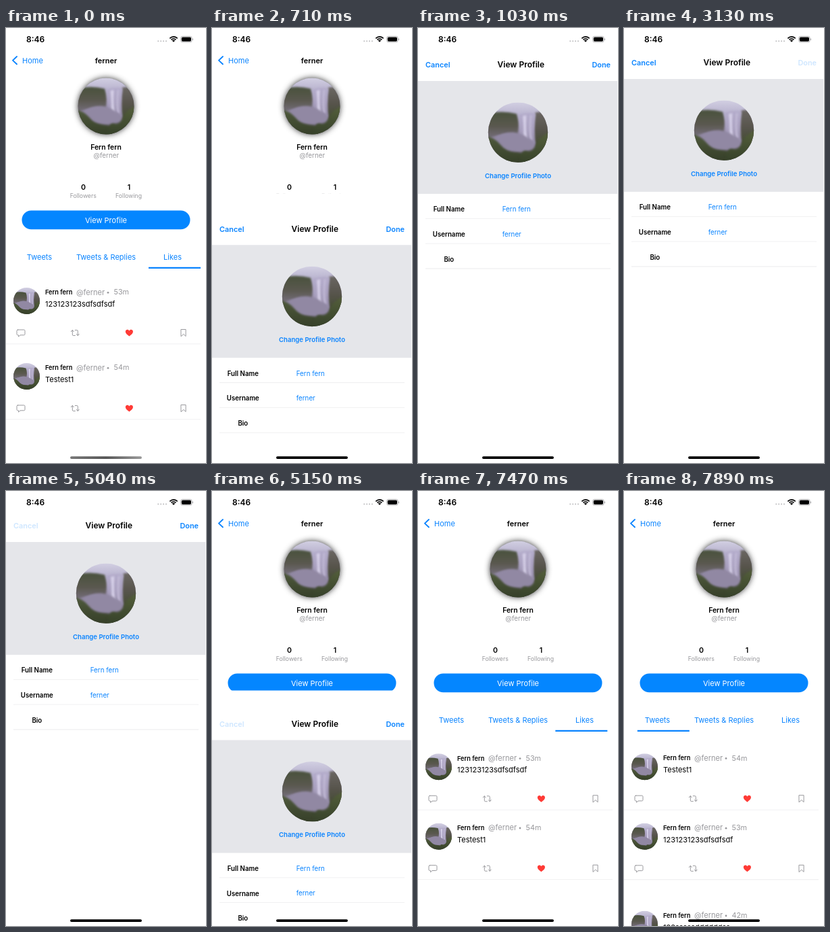
Animation of 296 by 640 pixels, one loop 8000 ms. Source, as an HTML page with a canvas:

```html
<!DOCTYPE html>
<html lang="en">
<head>
<meta charset="utf-8">
<title>Profile sheet</title>
<style>
html, body { margin: 0; width: 100%; height: 100%; overflow: hidden; background: #fff; }
canvas { display: block; width: 296px; height: 640px; }
</style>
</head>
<body>
<canvas id="stage"></canvas>
<script>
const W = 296, H = 640, LOOP = 8000;
const BLUE = '#0a84ff', GREY = '#98989c', LINE = '#ececee', INK = '#000';
const NAME = 'Fern fern', USER = 'ferner';

// The picture only updates at these times (ms).
const STEPS = [0, 500, 610, 710, 810, 920, 1030, 3130, 3250, 3370, 3480, 3600, 3720,
  4930, 5040, 5150, 5260, 5370, 5480, 7470, 7580, 7680, 7780, 7890];

const canvas = document.getElementById('stage');
const ctx = canvas.getContext('2d');
const dpr = window.devicePixelRatio || 1;
canvas.width = W * dpr;
canvas.height = H * dpr;

const clamp = v => Math.min(1, Math.max(0, v));
const mix = (a, b, p) => a + (b - a) * p;
const spring = x => x <= 0 ? 0 : 1 - (1 + x) * Math.exp(-x);

// y is the middle of the capital letters.
function text(str, x, y, size, { weight = 400, color = INK, align = 'left', alpha = 1 } = {}) {
  ctx.save();
  ctx.globalAlpha *= alpha;
  ctx.font = `${weight} ${size}px Inter, Roboto, sans-serif`;
  ctx.fillStyle = color;
  ctx.textAlign = align;
  ctx.fillText(str, x, y + size * 0.364);
  ctx.restore();
}

function rect(x, y, w, h, color, r = 0) {
  ctx.fillStyle = color;
  ctx.beginPath();
  ctx.roundRect(x, y, w, h, r);
  ctx.fill();
}

function disc(x, y, r, color) {
  ctx.fillStyle = color;
  ctx.beginPath();
  ctx.arc(x, y, r, 0, Math.PI * 2);
  ctx.fill();
}

function stroke(path, x, y, color, width) {
  ctx.save();
  ctx.translate(x, y);
  ctx.strokeStyle = color;
  ctx.lineWidth = width;
  ctx.lineCap = ctx.lineJoin = 'round';
  ctx.stroke(new Path2D(path));
  ctx.restore();
}

function shape(path, color) {
  ctx.fillStyle = color;
  ctx.fill(new Path2D(path));
}

function blend(y0, y1, ...colors) {
  const g = ctx.createLinearGradient(0, y0, 0, y1);
  colors.forEach((c, i) => g.addColorStop(i / (colors.length - 1), c));
  return g;
}

// Soft waterfall landscape in a circle.
function photo(x, y, r) {
  ctx.save();
  ctx.beginPath();
  ctx.arc(x, y, r, 0, Math.PI * 2);
  ctx.clip();
  ctx.translate(x, y);
  ctx.scale(r, r);
  rect(-1, -1, 2, 2, blend(-1, 1, '#d2cfe2', '#b4aecb', '#988fac', '#7d758c', '#4a4a44'));
  ctx.filter = `blur(${r * 0.035 * dpr}px)`;
  // cliffs
  shape('M-1.2-.58Q-.6-.76-.05-.62Q.08-.3-.02.1Q-.5-.05-1.2.3Z', blend(-.7, .3, '#48513b', '#5a584f', '#7b7385'));
  shape('M.58-.66Q.85-.72 1.2-.6V.5H.6Q.5 0 .58-.66Z', blend(-.7, .5, '#6b6763', '#57544c', '#424b30'));
  // falling water and mist
  shape('M.02-.58Q.35-.68.58-.62Q.5 0 .58.4H.02Q.1 0 .02-.58Z', blend(-.6, .4, '#b3abca', '#aaa1c0', '#958ca8'));
  shape('M.16-.55L.28-.57Q.24 0 .34.32H.16Q.22 0 .16-.55Z', '#d6d0e8');
  shape('M.4-.58H.47Q.4-.1.48.25H.4Q.35-.1.4-.58Z', '#c2bad6');
  shape('M-.8.2Q-.3-.15.2.1T.5.55Q0 .75-.5.55Z', '#9188a3');
  // foreground plants
  shape('M-1.2.08Q-.8.15-.6.4T-.1.66T.3.85V1.2H-1.2Z', blend(.1, 1, '#4f5a3c', '#363f29'));
  shape('M1.2-.05Q.75.08.62.38T.3.62T.05.9V1.2H1.2Z', blend(0, 1, '#545f3b', '#36412a'));
  ctx.restore();
}

function statusBar() {
  text('8:46', 30, 17, 12, { weight: 600 });
  for (let i = 0; i < 4; i++) disc(225.3 + i * 3.9, 19.3, 1.1, '#c4c4c6');
  ctx.strokeStyle = INK;
  ctx.lineWidth = 1.7;
  ctx.lineCap = 'butt';
  for (const r of [4.7, 7.7]) {
    ctx.beginPath();
    ctx.arc(248, 20.6, r, -Math.PI * 0.76, -Math.PI * 0.24);
    ctx.stroke();
  }
  shape('M248 20.8L245.8 18.5Q248 16.7 250.2 18.5Z', INK);
  ctx.strokeStyle = '#a4a4a6';
  ctx.lineWidth = 0.8;
  ctx.beginPath();
  ctx.roundRect(258.6, 12.3, 16.6, 8.6, 2.6);
  ctx.stroke();
  rect(259.8, 13.5, 14.2, 6.2, INK, 1.6);
  rect(276, 15.2, 1, 2.8, '#a4a4a6', 0.5);
}

function homeBar(faded) {
  let color = INK;
  if (faded) {
    color = ctx.createLinearGradient(95, 0, 201, 0);
    color.addColorStop(0, '#777');
    color.addColorStop(0.5, '#555');
    color.addColorStop(1, '#999');
  }
  rect(95, 630.2, 106, 3.8, color, 1.9);
}

function post(y, body, age) {
  photo(30.5, y + 13, 19.5);
  text(NAME, 58, y + 0.5, 9.2, { weight: 600 });
  text('@' + USER, 104, y, 11, { color: GREY });
  disc(151, y + 0.8, 1.4, GREY);
  text(age, 159.5, y, 10.8, { color: GREY });
  text(body, 58, y + 17.5, 11);

  const mid = y + 60;
  stroke('M-4.5-4.5H4.5Q6-4.5 6-3V1.8Q6 3.3 4.5 3.3H-1L-3.4 5.6V3.3H-4.5Q-6 3.3-6 1.8V-3Q-6-4.5-4.5-4.5Z',
    22, mid, '#9a9a9e', 1);
  stroke('M-6-1.8L-4-4L-2-1.8M-4-4V2.4Q-4 4-2.5 4H0M6 1.8L4 4L2 1.8M4 4V-2.4Q4-4 2.5-4H0',
    102.3, mid, '#9a9a9e', 1);
  stroke('M-3.4-5H3.4V5L0 1.9L-3.4 5Z', 262.7, mid, '#9a9a9e', 1);
  ctx.save();
  ctx.translate(182.4, mid);
  shape('M0 5C-3.2 2.7-5.6.6-5.6-1.8C-5.6-5-1.6-6 0-3.1C1.6-6 5.6-5 5.6-1.8C5.6.6 3.2 2.7 0 5Z', '#ff3b36');
  ctx.restore();
  rect(0, y + 76, 288, 0.8, LINE);
}

function profile(t) {
  stroke('M6-5.6L0 0L6 5.6', 10, 47.6, BLUE, 1.9);
  text('Home', 24, 48, 11, { color: BLUE });
  const mid = { align: 'center' }, strong = { weight: 600, align: 'center' };
  const soft = { color: GREY, align: 'center' };
  text(USER, 148, 48, 11, strong);

  ctx.save();
  ctx.shadowColor = 'rgba(0,0,0,.85)';
  ctx.shadowBlur = 10 * dpr;
  disc(148, 115, 41, '#444');
  ctx.restore();
  photo(148, 115, 41.5);
  text(NAME, 148, 175, 10.4, strong);
  text('@' + USER, 148.3, 187.5, 9.8, soft);

  text('0', 114.5, 234.5, 10.6, strong);
  text('1', 182, 234.5, 10.6, strong);
  text('Followers', 114.2, 246.5, 8.7, soft);
  text('Following', 181.5, 246.5, 8.7, soft);

  ctx.save();
  if (t >= 500 && t < 1030) ctx.globalAlpha = mix(0.2, 1, clamp((t - 500) / 470));
  rect(23.5, 268.5, 249, 27.8, '#0486ff', 13.9);
  text('View Profile', 148, 282.5, 11, { ...mid, color: '#fff' });
  ctx.restore();

  const p = spring(11.4 * (t - 7443) / 1000);
  text('Tweets', 49.5, 337, 11, { ...mid, color: BLUE });
  text('Tweets & Replies', 148, 337, 11, { ...mid, color: BLUE });
  text('Likes', 246.5, 337, 11, { ...mid, color: BLUE });
  rect(mix(211, 12.4, p), 351.8, 77, 2.2, BLUE);

  // The two posts trade places while a third rises from below.
  post(mix(388.5, 499.5, p), '123123123sdfsdfsdf', '53m');
  post(mix(499.5, 388.5, p), 'Testest1', '54m');
  if (p > 0) post(mix(978, 610.5, p), '123sssssddddddss', '42m');
}

function sheet(t, top) {
  const y = top - (t >= 3130 ? 3 : 0);
  let done = 1;
  if (t >= 3130 && t < 3720) done = mix(0.2, 1, clamp((t - 3250) / 470));
  const cancel = t >= 4930 ? 0.2 : 1;

  rect(0, top + 2, W, H, '#fff');
  text('Cancel', 11, y + 54.2, 10.9, { weight: 600, color: BLUE, alpha: cancel });
  text('View Profile', 152.3, y + 53.8, 12, { weight: 600, align: 'center' });
  text('Done', 285, y + 54.2, 10.9, { weight: 600, color: BLUE, align: 'right', alpha: done });

  rect(0, y + 78, 295, 166, '#e5e6ea');
  photo(148, y + 153.6, 44.2);
  text('Change Profile Photo', 148, y + 217.5, 9.6, { weight: 600, color: BLUE, align: 'center' });

  [['Full Name', NAME], ['Username', USER], ['Bio', '']].forEach(([label, value], i) => {
    const rowY = y + 266.8 + i * 36.8;
    text(label, 45.8, rowY, 9.7, { weight: 600, align: 'center' });
    text(value, 124.7, rowY - 0.2, 9.8, { color: BLUE });
    rect(11, rowY + 13.2, 274, 0.8, LINE);
  });
}

function sheetTop(t) {
  if (t < 500 || t >= 5480) return H;
  if (t < 1030) return H * (1 - spring(14 * (t - 559.3) / 1000));
  return H * spring(14 * (t - 5040) / 1000);
}

function draw(t) {
  ctx.setTransform(dpr, 0, 0, dpr, 0, 0);
  rect(0, 0, W, H, '#fff');
  const top = sheetTop(t);
  if (top > 0) profile(t);
  if (top < H) sheet(t, top);
  statusBar();
  homeBar(t < 500);
}

const start = performance.now();
function tick() {
  const now = (performance.now() - start) % LOOP;
  draw(STEPS.findLast(s => s <= now) ?? 0);
  requestAnimationFrame(tick);
}
tick();
</script>
</body>
</html>
```
